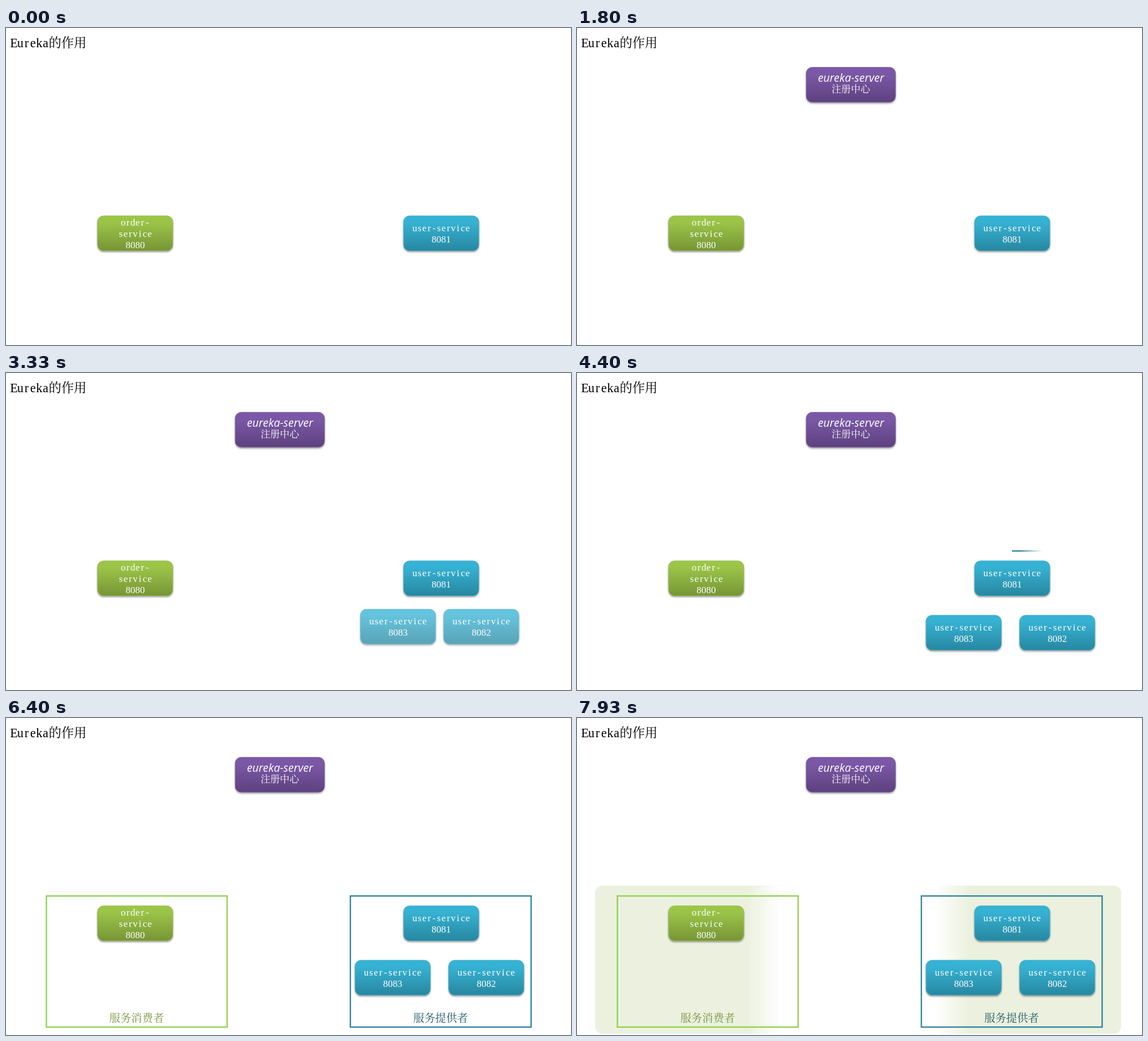
An HTML page that plays this animation: 999 px wide and 560 px high, repeating every 8000 ms.

```html
<!DOCTYPE html>
<html lang="zh">
<head>
<meta charset="utf-8">
<title>Eureka的作用</title>
<style>
  html, body { margin: 0; width: 999px; height: 560px; overflow: hidden; background: #fff; }
  svg { position: absolute; left: 0; top: 0; width: 999px; height: 560px; }
  text { font-family: "Liberation Serif", "Noto Serif CJK SC", "Noto Sans CJK SC", "Noto Sans CJK", serif; text-anchor: middle; }
  .hand { font: italic 19.6px "Open Sans", sans-serif; }
</style>
</head>
<body>
<script>
const LOOP = 8000, STEP = 1000 / 15;
const NS = 'http://www.w3.org/2000/svg';

function add(parent, tag, attrs = {}, content = '') {
  const el = document.createElementNS(NS, tag);
  for (const key in attrs) el.setAttribute(key, attrs[key]);
  el.textContent = content;
  return parent.appendChild(el);
}

const layer = () => add(document.body, 'svg', { viewBox: '0 0 999 560' });

// Text on a fixed grid: Latin characters take half an em, Chinese a full one.
function gridText(parent, content, centre, y, size, fill) {
  const widths = [...content].map(c => c < '\u0100' ? size / 2 : size);
  let edge = centre - widths.reduce((a, b) => a + b) / 2;
  const x = widths.map(w => ((edge += w) - w / 2).toFixed(2)).join(' ');
  return add(parent, 'text', { x, y, 'font-size': size, fill }, content);
}

const bandLayer = layer(), providerLayer = layer(), consumerLayer = layer(), nodeLayer = layer();

const defs = add(nodeLayer, 'defs');
const shadow = add(defs, 'filter', { id: 'shadow', x: '-10%', y: '-20%', width: '120%', height: '145%', 'color-interpolation-filters': 'sRGB' });
add(shadow, 'feDropShadow', { dx: 0, dy: 2, stdDeviation: 1.5, 'flood-color': '#000', 'flood-opacity': 0.38 });

const themes = {
  green: ['#9CC746', '#9BC348', '#769535', '#98B855'],
  purple: ['#7B57A8', '#7B58A6', '#5D417E', '#7D60A0'],
  blue: ['#34B3D6', '#36B1D2', '#2787A0', '#46AAC5']
};
for (const name in themes) {
  const gradient = add(defs, 'linearGradient', { id: name, x1: 0, y1: 0, x2: 0, y2: 1 });
  [0, 0.2, 1].forEach((offset, i) => add(gradient, 'stop', { offset, 'stop-color': themes[name][i] }));
}

function node(theme, x, y, width) {
  const g = add(nodeLayer, 'g');
  add(g, 'rect', { x, y, width, height: 61.6, rx: 10.5, fill: `url(#${theme})`, stroke: themes[theme][3], filter: 'url(#shadow)' });
  return g;
}

function service(theme, x, y, lines, baseline) {
  const g = node(theme, x, y, 133);
  lines.forEach((line, i) => gridText(g, line, x + 66.6, y + baseline + i * 20.4, 17, '#fff'));
  return g;
}

function frame(svg, x, stroke, label, fill) {
  add(svg, 'rect', { x, y: 314.4, width: 319.6, height: 231.6, fill: 'none', stroke, 'stroke-width': 2.4 });
  gridText(svg, label, x + 159.6, 536.5, 19.3, fill);
}

add(bandLayer, 'rect', { x: 32, y: 296, width: 930, height: 262, rx: 13, fill: '#EBF1DE' });
frame(providerLayer, 608.9, '#31859C', '服务提供者', '#215968');
frame(consumerLayer, 71.4, '#92D050', '服务消费者', '#77933C');

gridText(nodeLayer, 'Eureka的作用', 75.5, 34, 22.3, '#000');
service('green', 161.9, 331.9, ['order-', 'service', '8080'], 16.6);
service('blue', 703, 331.9, ['user-service', '8081'], 26.6);
const left = service('blue', 617.2, 428, ['user-service', '8083'], 26.6);
const right = service('blue', 782.7, 428, ['user-service', '8082'], 26.6);
const server = node('purple', 405.3, 69.4, 157.8);
add(server, 'text', { x: 484.4, y: 95, class: 'hand', fill: '#fff' }, 'eureka-server');
gridText(server, '注册中心', 484.2, 114, 17, '#fff');

const progress = (t, start, duration) => Math.min(1, Math.max(0, (t - start) / duration));
const easeInOut = p => p < 0.5 ? 2 * p * p : 1 - 2 * (1 - p) * (1 - p);

function setMask(el, p, image) {
  const value = p > 0 && p < 1 ? image : 'none';
  el.style.visibility = p > 0 ? 'visible' : 'hidden';
  el.style.webkitMaskImage = value;
  el.style.maskImage = value;
}

function wheel(el, p, cx) {
  const feather = 18, lead = p * (360 + feather);
  setMask(el, p, `conic-gradient(from 0deg at ${cx}px 430.2px, #000 ${lead - feather}deg, transparent ${lead}deg)`);
}

function splitIn(el, p) {
  const feather = 60, lead = 32 + p * (465 + feather), solid = lead - feather;
  setMask(el, p, `linear-gradient(90deg, #000 ${solid}px, transparent ${lead}px, transparent ${994 - lead}px, #000 ${994 - solid}px)`);
}

function fly(el, p, dx, dy, rest) {
  el.setAttribute('opacity', p);
  el.setAttribute('transform', `translate(${dx * rest} ${dy * rest})`);
}

function render(time) {
  const t = Math.floor(time / STEP + 0.06) * STEP;
  const rise = progress(t, 733, 1000);
  fly(server, rise, 0, 66, 1 - rise);
  const spread = progress(t, 2467, 1133);
  const rest = 1 - easeInOut(spread);
  fly(left, spread, 85.8, -96.1, rest);
  fly(right, spread, -79.7, -96.1, rest);
  wheel(providerLayer, progress(t, 4333, 1000), 768.7);
  wheel(consumerLayer, progress(t, 5333, 1000), 231.2);
  splitIn(bandLayer, progress(t, 7600, 533));
}

const begin = performance.now();
function tick() {
  render((performance.now() - begin) % LOOP);
  requestAnimationFrame(tick);
}
tick();
</script>
</body>
</html>
```
